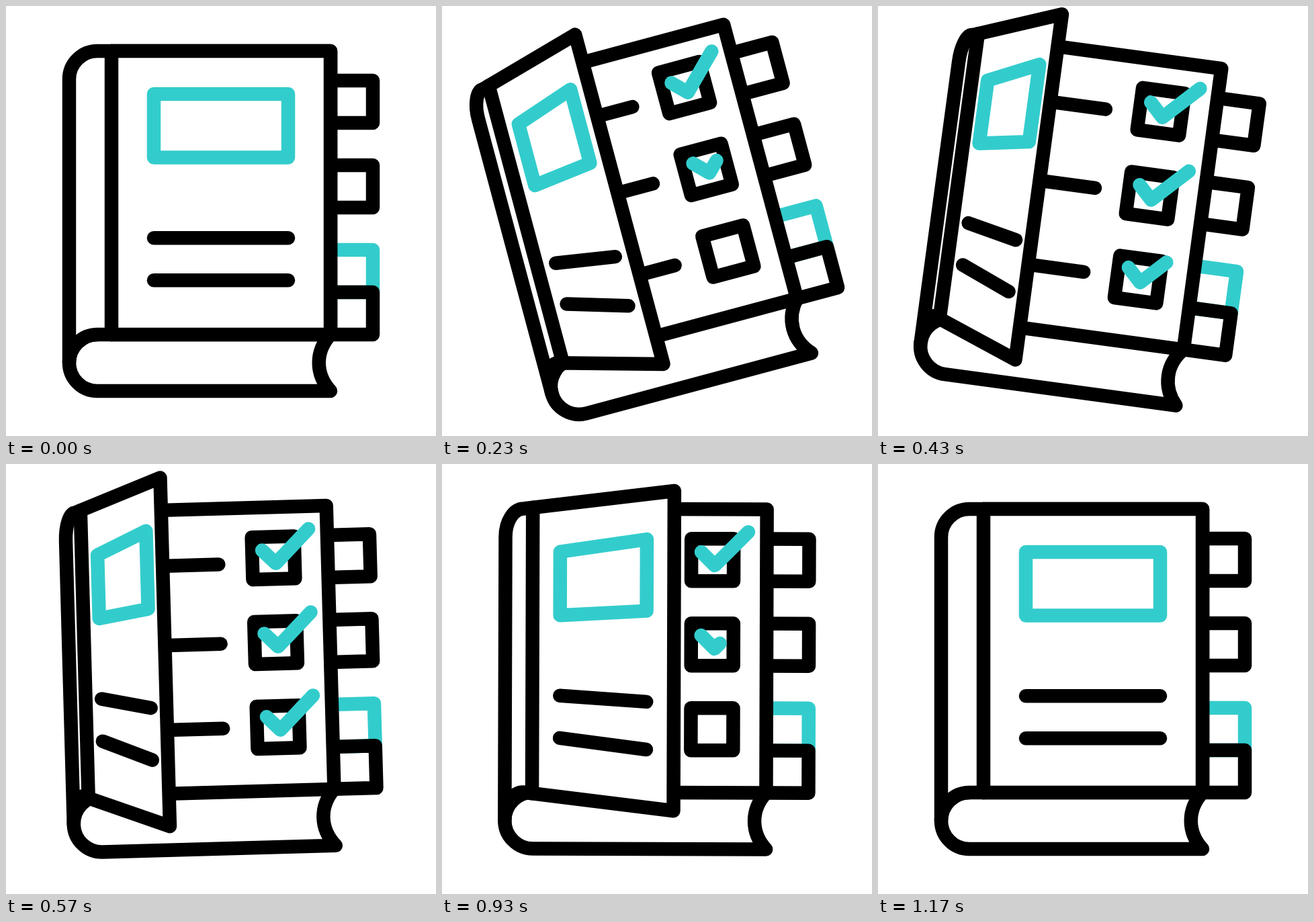
An HTML page with a canvas for the animation above (1670 ms loop, 640 px wide and 640 px high).

```html
<!DOCTYPE html>
<html lang="en">
<head>
<meta charset="utf-8">
<title>Checklist book</title>
<style>
  html, body { margin: 0; height: 100%; overflow: hidden; background: #fff; }
  canvas { display: block; }
</style>
</head>
<body>
<canvas id="stage" width="640" height="640"></canvas>
<script>
const ctx = document.getElementById('stage').getContext('2d');
const BLACK = '#000', TEAL = '#33cccc';
const LOOP = 1670, LAST_STEP = 35, STEPS_PER_MS = 0.03;
const PIVOT = [302, 290];
const CHECK_LENGTH = 99;

// Damped swing of the whole book: [step, degrees]
const SWING = [[0, 0], [7, -15], [13, 7.7], [19, -4.7], [24, 1.7], [29, 0]];

const clamp = v => Math.min(1, Math.max(0, v));
const ease = v => (1 - Math.cos(Math.PI * clamp(v))) / 2;
const mix = (a, b, u) => a + (b - a) * u;

function swingAt(step) {
  const i = SWING.findIndex(key => key[0] > step);
  if (i < 0) return 0;
  const [t0, a0] = SWING[i - 1], [t1, a1] = SWING[i];
  return mix(a0, a1, ease((step - t0) / (t1 - t0)));
}

function draw(d, color = BLACK, filled = false) {
  const path = new Path2D(d);
  if (filled) {
    ctx.fillStyle = '#fff';
    ctx.fill(path);
  }
  ctx.strokeStyle = color;
  ctx.stroke(path);
}

function drawPage(checks) {
  draw('M483 489C460 514 460 548 483 573H136a42 42 0 0 1 0-84', BLACK, true);
  draw('M483 363H546V426H483', TEAL);
  for (const y of [111, 237, 426]) draw(`M483 ${y}h63v63h-63`);
  draw('M157 67H483V489H157Z', BLACK, true);
  for (const y of [150, 268.3, 394.3]) draw(`M200 ${y}H320.3`);
  for (let i = 0; i < 3; i++) {
    draw(`M370.7 ${111 + 126 * i}h63v63h-63z`);
    const shown = clamp(checks - i);
    if (!shown) continue;
    ctx.setLineDash(shown < 1 ? [CHECK_LENGTH * shown, 200] : []);
    draw(`M385.5 ${130.7 + 124 * i}l20 20 50-50`, TEAL);
    ctx.setLineDash([]);
  }
}

function drawCover(open) {
  const bend = mix(136, 109, open), hinge = mix(157, 117, open);
  const edge = mix(483, 237, open), lift = 48.5 * open;
  const hingeLift = lift * (hinge - bend) / (edge - bend);
  const rx = bend - 94;
  draw(`M94 531V109A${rx} 42 0 0 1 ${bend} 67L${edge} ${67 - lift}V${489 + lift}
        L${bend} 489A${rx} 42 0 0 0 94 531`, BLACK, true);
  draw(`M${hinge} ${67 - hingeLift}V${489 + hingeLift}`);

  const left = mix(220, 140.5, open), right = mix(420, 213.7, open);
  draw(`M${left} 131L${right} ${131 - 33.8 * open}V${225.5 - 12.3 * open}L${left} 225.5Z`, TEAL);
  draw(`M${left} 345.2L${right} ${345.2 + 15.5 * open}`);
  draw(`M${left} 408.2L${right} ${408.2 + 30 * open}`);
}

function render(ms) {
  const step = Math.min(LAST_STEP, Math.floor((ms + 3.4) * STEPS_PER_MS));
  const open = Math.min(ease(step / 9), 1 - ease((step - 22) / 13));
  const checks = Math.min(step * 3 / 14, (LAST_STEP - step) / 5);

  ctx.setTransform(1, 0, 0, 1, 0, 0);
  ctx.fillStyle = '#fff';
  ctx.fillRect(0, 0, 640, 640);
  ctx.translate(...PIVOT);
  ctx.rotate(swingAt(step) * Math.PI / 180);
  ctx.translate(-PIVOT[0], -PIVOT[1]);
  ctx.lineWidth = 20.5;
  ctx.lineCap = ctx.lineJoin = 'round';
  drawPage(checks);
  drawCover(open);
}

const start = performance.now();
function tick() {
  render((performance.now() - start) % LOOP);
  requestAnimationFrame(tick);
}
tick();
</script>
</body>
</html>
```
